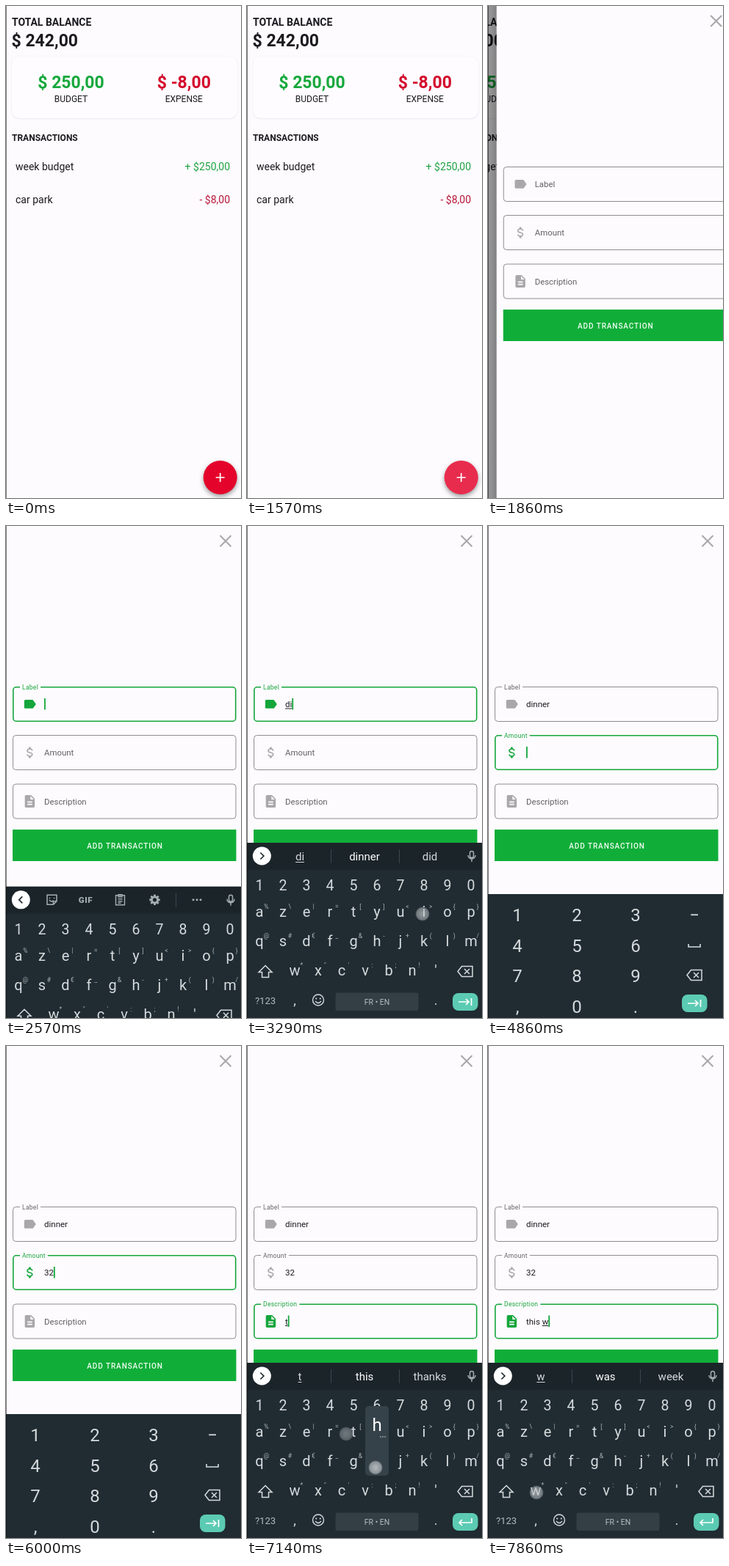
Write an HTML page with a canvas that moves like this. It is 320 px wide and 671 px high and loops after 8000 ms.

```html
<!DOCTYPE html>
<html lang="en">
<head>
<meta charset="utf-8">
<title>Budget app</title>
<style>
  html, body { margin: 0; width: 100%; height: 100%; overflow: hidden; background: #fffbfe; }
  canvas { display: block; width: 320px; height: 671px; }
</style>
</head>
<body>
<canvas id="stage"></canvas>
<script>
const W = 320, H = 671, LOOP = 8000, FPS = 7;
const PAPER = '#fdfbfe', INK = '#1c1b1f', GREEN = '#10ae39', ACTIVE = '#14a63b', RED = '#e4042b';
const GREY = '#a9a7aa', KEY = '#d5dadd', TEAL = '#5ccbb3';
const canvas = document.getElementById('stage');
const ctx = canvas.getContext('2d');
const dpr = window.devicePixelRatio || 1;
canvas.width = W * dpr;
canvas.height = H * dpr;

const ICONS = {
  tag: 'M17.63 5.84C17.27 5.33 16.67 5 16 5L5 5.01C3.9 5.01 3 5.9 3 7v10c0 1.1.9 1.99 2 1.99L16 19c.67 0 1.27-.33 1.63-.84L22 12z',
  dollar: 'M7 15h2c0 1.08 1.37 2 3 2s3-.92 3-2c0-1.1-1.04-1.5-3.24-2.03C9.64 12.44 7 11.78 7 9c0-1.79 1.47-3.31 3.5-3.82V3h3v2.18C15.53 5.69 17 7.21 17 9h-2c0-1.08-1.37-2-3-2s-3 .92-3 2c0 1.1 1.04 1.5 3.24 2.03C14.36 11.56 17 12.22 17 15c0 1.79-1.47 3.31-3.5 3.82V21h-3v-2.18C8.47 18.31 7 16.79 7 15z',
  page: 'M14 2H6c-1.1 0-2 .9-2 2v16c0 1.1.9 2 2 2h12c1.1 0 2-.9 2-2V8zM16 18H8v-2h8zM16 14H8v-2h8zM13 9V3.5L18.5 9z'
};
for (const name in ICONS) ICONS[name] = new Path2D(ICONS[name]);

const FIELDS = [
  { name: 'Label', icon: 'tag', y: 219.5, focus: 2420, blur: 4700 },
  { name: 'Amount', icon: 'dollar', y: 285.5, focus: 4700, blur: 6420 },
  { name: 'Description', icon: 'page', y: 352, focus: 6420, blur: LOOP }
];

// Key, moment it is released, and how far beside its centre the finger lands.
const TYPED = [
  [['d', 2990], ['i', 3270], ['n', 3550], ['n', 3700], ['e', 3960], ['r', 4270]],
  [['3', 5270], ['2', 5690]],
  [['t', 7060, -8], ['h', 7270], ['i', 7410], ['s', 7560], [' ', 7700], ['w', 7840, 3]]
];

const SUGGESTIONS = {
  d: 'd day de', di: 'di dinner did', din: 'din dinner dining', dinn: 'dinn dinner dinners',
  dinne: 'dinne dinner donner', dinner: 'dinner dinners dinner?',
  t: 't this thanks', th: 'th the this', thi: 'thi this think', this: 'this thus these',
  'this ': 'is week was', 'this w': 'w was week'
};

const ROWS = [
  { keys: 'azertyuiop', hints: '%\\|=[]<>{}', x: 17, y: 527 },
  { keys: 'qsdfghjklm', hints: '@#€_&-+()/', x: 17, y: 567 },
  { keys: "wxcvbn'", hints: '*"\':;!', x: 65, y: 607 }
];
const PAD = ['123−', '456 ', '789 ', ',0. '];
const PAD_X = [40, 121, 201, 281], PAD_Y = [530, 572, 613, 655];

const clamp = v => Math.min(1, Math.max(0, v));
const mix = (a, b, p) => a + (b - a) * p;

function text(str, x, y, size, color, { weight = 400, align = 'left', spacing = 0 } = {}) {
  ctx.font = `${weight} ${size}px Roboto, sans-serif`;
  ctx.letterSpacing = spacing + 'px';
  ctx.textAlign = align;
  ctx.fillStyle = color;
  ctx.fillText(str, x, y);
  return ctx.measureText(str).width;
}

function rect(x, y, w, h, color) {
  ctx.fillStyle = color;
  ctx.fillRect(x, y, w, h);
}

function round(x, y, w, h, r) {
  ctx.beginPath();
  ctx.roundRect(x, y, w, h, r);
}

function disc(x, y, r, color) {
  ctx.beginPath();
  ctx.arc(x, y, r, 0, 7);
  ctx.fillStyle = color;
  ctx.fill();
}

function ring(x, y, r, color, width) {
  ctx.beginPath();
  ctx.arc(x, y, r, 0, 7);
  ctx.strokeStyle = color;
  ctx.lineWidth = width;
  ctx.stroke();
}

function stroke(path, color, width, x = 0, y = 0) {
  ctx.save();
  ctx.translate(x, y);
  ctx.strokeStyle = color;
  ctx.lineWidth = width;
  ctx.stroke(new Path2D(path));
  ctx.restore();
}

function shadow(color, blur, dy) {
  ctx.shadowColor = color;
  ctx.shadowBlur = blur * dpr;
  ctx.shadowOffsetY = dy * dpr;
}

function drawHome(t) {
  const mid = { align: 'center' }, end = { align: 'right' };
  const bold = { weight: 700 }, boldMid = { weight: 700, align: 'center' };
  rect(0, 0, W, H, PAPER);
  text('TOTAL BALANCE', 8, 27, 14, INK, bold);
  text('$ 242,00', 7.5, 55, 23, INK, bold);
  ctx.save();
  shadow('rgba(60,50,70,.14)', 2, 0.5);
  round(8, 69, 307, 84, 10);
  ctx.fillStyle = '#fefcff';
  ctx.fill();
  ctx.restore();
  text('$ 250,00', 88.5, 112, 23, '#16a83c', boldMid);
  text('$ -8,00', 242.3, 112, 23, '#d30a2c', boldMid);
  text('BUDGET', 88.5, 131, 12, INK, mid);
  text('EXPENSE', 242.3, 131, 12, INK, mid);
  text('TRANSACTIONS', 8, 184, 12, INK, bold);
  text('week budget', 13, 223.5, 14, INK);
  text('+ $250,00', 305, 223.5, 14, '#1ea342', end);
  text('car park', 13, 268.5, 14, INK);
  text('- $8,00', 305, 268.5, 14, '#b8183a', end);

  ctx.save();
  shadow('rgba(0,0,0,.4)', 6, 3);
  disc(291.7, 643, 23, RED);
  ctx.restore();
  if (t >= 1540) disc(291.7, 643, 23, 'rgba(255,255,255,.16)');
  stroke('M-6 0H6M0-6V6', '#fff', 1.7, 291.7, 643);
}

function valueAt(index, t) {
  return TYPED[index].filter(k => t >= k[1]).map(k => k[0]).join('');
}

function drawField(field, index, t) {
  const { y, name } = field;
  const active = t >= field.focus && t < field.blur;
  const lift = clamp((t - field.focus) / 140);
  const size = mix(11.4, 8.5, lift);
  const labelX = mix(52, 22, lift);
  const line = active ? 1.6 : 1;

  // The outline grows inwards from a fixed outer edge.
  const inset = (line - 1) / 2;
  round(9.5 + inset, y + inset, 303.5 - 2 * inset, 47 - 2 * inset, 4);
  ctx.strokeStyle = active ? ACTIVE : '#8f8d90';
  ctx.lineWidth = line;
  ctx.stroke();

  ctx.font = `400 ${size}px Roboto, sans-serif`;
  ctx.letterSpacing = 0.3 * lift + 'px';
  if (lift > 0.5) rect(labelX - 3, y - 2, ctx.measureText(name).width + 6, 4, PAPER);
  text(name, labelX, mix(y + 27.5, y + 3, lift), size, active ? ACTIVE : '#626064', { spacing: 0.3 * lift });

  ctx.save();
  ctx.translate(22.3, y + 13.4);
  ctx.scale(0.84, 0.84);
  ctx.fillStyle = active ? ACTIVE : GREY;
  ctx.fill(ICONS[field.icon], 'evenodd');
  ctx.restore();

  const value = valueAt(index, t);
  const width = text(value, 52, y + 27.8, 11.5, INK);
  if (!active) return;
  if (index !== 1) {
    const start = value.lastIndexOf(' ') + 1;
    const before = ctx.measureText(value.slice(0, start)).width;
    rect(52 + before, y + 29, width - before, 1, INK);
  }
  const edits = TYPED[index].map(k => k[1]).filter(time => time <= t);
  const since = t - Math.max(field.focus, ...edits);
  if (since % 1000 < 500) rect(52 + width, y + 15.5, 1.8, 15.5, ACTIVE);
}

function drawForm(t) {
  rect(0, 0, W, H, PAPER);
  stroke('M-7.5-7.5L7.5 7.5M7.5-7.5L-7.5 7.5', GREY, 2.1, 299, 20.5);
  FIELDS.forEach((field, i) => drawField(field, i, t));
  rect(9, 414, 304.5, 43, GREEN);
  text('ADD TRANSACTION', 162, 439.5, 10, '#f4fbf5', { weight: 500, align: 'center', spacing: 0.9 });
}

function drawAction(x, y, enter) {
  round(x - 17, y - 12, 34.5, 24, 8);
  ctx.fillStyle = TEAL;
  ctx.fill();
  stroke(enter ? 'M9-5V1H-8M-4-3L-8 1L-4 5' : 'M-9 0H5M1-4L5 0L1 4M8.5-5V5', '#fff', 1.7, x, y);
}

function drawBackspace(x, y) {
  stroke('M-10 0L-4.5-7H10V7H-4.5ZM-1-3.5L6 3.5M6-3.5L-1 3.5', KEY, 1.5, x, y);
}

function drawToolbar(words) {
  const tint = '#a4adb2';
  disc(20.3, 450, 12.5, '#fff');
  stroke(words ? 'M-2-4.5L2.5 0L-2 4.5' : 'M2-4.5L-2.5 0L2 4.5', '#20292e', 1.7, 20.3, 450);
  stroke('M-2.5-4A2.5 2.5 0 0 1 2.5-4V0A2.5 2.5 0 0 1-2.5 0ZM-5-1A5 5 0 0 0 5-1M0 4V8', tint, 1.5, 306, 450);
  if (words) {
    words.forEach((word, i) => {
      const x = [72, 160, 249][i];
      const w = text(word, x, 456, 15, i === 1 ? '#fff' : KEY, { align: 'center' });
      if (i === 0) rect(x - w / 2, 458, w, 1, KEY);
    });
    rect(114, 441, 1, 19, '#3b464c');
    rect(207, 441, 1, 19, '#3b464c');
    return;
  }
  stroke('M-6.5-6.5H6.5V2L2 6.5H-6.5ZM6.5 2H2V6.5M-3.5 0Q-1 4 2 1M-3-3V-1.5M3-3V-1.5', tint, 1.5, 62.5, 450);
  text('GIF', 108.5, 454, 11.5, tint, { weight: 900, align: 'center', spacing: 0.6 });
  stroke('M-6-6H6V7H-6ZM-2.5-7H2.5V-4H-2.5ZM-3-1H3M-3 2H3M-3 4.5H1', tint, 1.4, 155.5, 450);
  ctx.save();
  ctx.translate(202.5, 450);
  for (let i = 0; i < 8; i++) {
    ctx.rotate(Math.PI / 4);
    rect(-1.5, -7.2, 3, 3, tint);
  }
  ctx.restore();
  ring(202.5, 450, 4, tint, 2.8);
  rect(231, 441, 1, 19, '#3b464c');
  for (const dx of [-5, 0, 5]) disc(260 + dx, 450, 1.5, tint);
}

function drawLetters(words, enter) {
  const mid = { align: 'center' };
  rect(0, 432, W, H, '#202c32');
  rect(0, 432, W, 37, '#1b2429');
  drawToolbar(words);
  [...'1234567890'].forEach((d, i) => text(d, 17 + 32 * i, 497, 19.5, KEY, mid));
  for (const row of ROWS) {
    [...row.keys].forEach((key, i) => {
      const x = row.x + 32 * i;
      text(key, x, row.y + 5.7, 20, KEY, mid);
      if (row.hints[i]) text(row.hints[i], x + 9.3, row.y - 5, 8.5, '#a9b2b7', mid);
    });
  }
  stroke('M0-8L9 1H4.5V8H-4.5V1H-9Z', KEY, 1.5, 25, 607.5);
  drawBackspace(297, 607.5);
  text('?123', 25, 652, 13, '#b4bdc1', mid);
  text(',', 65, 653, 18, KEY, mid);
  text('.', 257, 653, 18, KEY, mid);
  ring(97, 646.5, 7.5, KEY, 1.4);
  disc(94.2, 644.5, 1.1, KEY);
  disc(99.8, 644.5, 1.1, KEY);
  stroke('M-4 1.5Q0 6.5 4 1.5', KEY, 1.3, 97, 646.5);
  round(120.5, 636.5, 113, 24.5, 3);
  ctx.fillStyle = '#333f45';
  ctx.fill();
  text('FR • EN', 177, 652.5, 10.5, '#b4bdc1', mid);
  drawAction(297, 649, enter);
}

function drawPad() {
  rect(0, 502, W, H, '#202c32');
  PAD.forEach((row, r) => [...row].forEach((key, c) =>
    text(key, PAD_X[c], PAD_Y[r] + 8.5, 24, KEY, { align: 'center' })));
  stroke('M-8-2V2H8V-2', KEY, 1.6, 281, 572);
  drawBackspace(281, 612.5);
  drawAction(281, 651);
}

function keyPlace(key) {
  if (key === ' ') return [177, 648];
  for (const row of ROWS) {
    const i = row.keys.indexOf(key);
    if (i >= 0) return [row.x + 32 * i, row.y];
  }
  const r = PAD.findIndex(row => row.includes(key));
  return [PAD_X[PAD[r].indexOf(key)], PAD_Y[r]];
}

function drawTouch(x, y, t, release) {
  const age = t - release;
  if (age < -150 || age > 150) return;
  const alpha = age < 0 ? 0.8 : 0.65 * (1 - (age / 150) ** 2);
  const glow = ctx.createRadialGradient(x, y, 2, x, y, 10);
  glow.addColorStop(0, `rgba(200,205,208,${alpha})`);
  glow.addColorStop(0.75, `rgba(160,166,170,${alpha})`);
  glow.addColorStop(1, 'rgba(150,156,160,0)');
  disc(x, y, 10, glow);
}

function drawPopup(key, x, y) {
  round(x - 16, y - 76, 32, 95, 5);
  ctx.fillStyle = '#36424a';
  ctx.fill();
  text(key, x, y - 42, 24, '#fff', { align: 'center' });
  for (let i = 0; i < 3; i++) disc(x + 5 + 3 * i, y - 34, 0.8, KEY);
}

function drawTouches(t) {
  TYPED.forEach((keys, group) => keys.forEach(([key, release, aside = 0]) => {
    const [x, y] = keyPlace(key);
    const pressed = t >= release - 150 && t < release;
    if (pressed && group !== 1 && key !== ' ') drawPopup(key, x, y);
    drawTouch(x - 2 + aside, y + (pressed ? 8 : 2), t, release);
  }));
  drawTouch(297, 649, t, 4620);
  drawTouch(281, 652, t, 6360);
}

function drawKeyboard(t) {
  if (t < 2430) return;
  if (t >= 4700 && t < 6420) {
    drawPad();
  } else {
    const index = t < 4700 ? 0 : 2;
    const words = SUGGESTIONS[valueAt(index, t)];
    ctx.save();
    ctx.translate(0, 239 * (1 - clamp((t - 2430) / 283)) ** 2);
    drawLetters(words && words.split(' '), index === 2);
    ctx.restore();
  }
  drawTouches(t);
}

function render(t) {
  ctx.setTransform(dpr, 0, 0, dpr, 0, 0);
  const slide = W * (1 - clamp((t - 1590) / 400)) ** 3;
  if (slide > 0) {
    ctx.save();
    ctx.translate(-0.25 * (W - slide), 0);
    drawHome(t);
    ctx.restore();
    if (slide < W) {
      rect(0, 0, W, H, `rgba(0,0,0,${0.4 * (1 - slide / W)})`);
      const edge = ctx.createLinearGradient(slide - 12, 0, slide, 0);
      edge.addColorStop(0, 'rgba(0,0,0,0)');
      edge.addColorStop(1, 'rgba(0,0,0,.18)');
      rect(slide - 12, 0, 12, H, edge);
    }
  }
  if (slide < W) {
    ctx.save();
    ctx.translate(slide, 0);
    drawForm(t);
    ctx.restore();
  }
  drawKeyboard(t);
  rect(0, 0, 1, H, 'rgba(0,0,0,.5)');
}

const began = performance.now();
function tick() {
  const t = (performance.now() - began) % LOOP;
  render(Math.floor((t + 5) * FPS / 1000) % (LOOP * FPS / 1000) * 1000 / FPS);
  requestAnimationFrame(tick);
}
tick();
</script>
</body>
</html>
```
